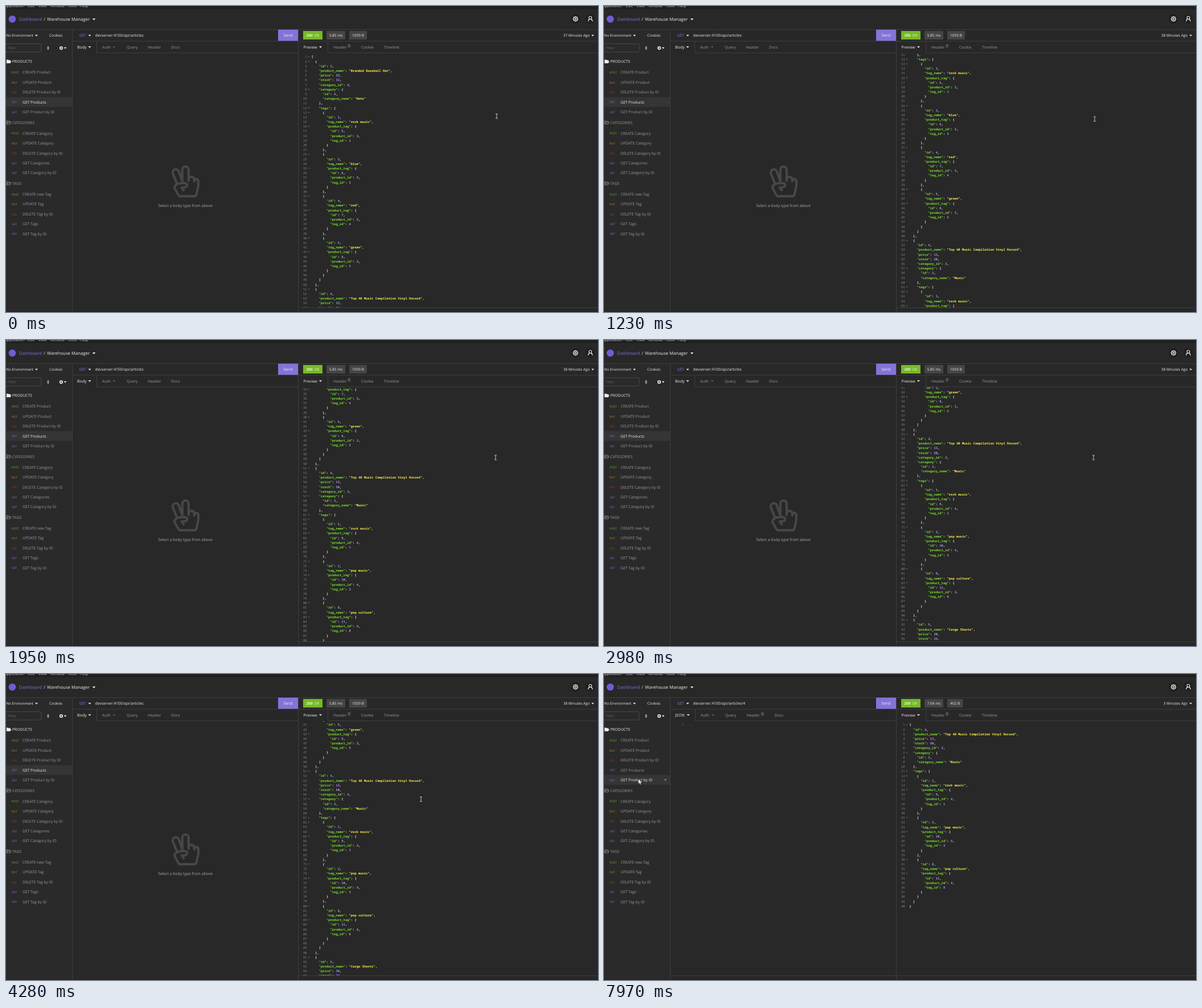
Animation, 1040 px wide and 539 px high, one loop 8000 ms. Source, as an HTML page with a canvas:

```html
<!DOCTYPE html>
<html lang="en">
<head>
<meta charset="utf-8">
<title>API client</title>
<style>
html, body { margin: 0; width: 100%; height: 100%; overflow: hidden; background: #282828; }
canvas { display: block; width: 1040px; height: 539px; }
</style>
</head>
<body>
<canvas id="stage" width="1040" height="539"></canvas>
<script>
const ctx = document.getElementById('stage').getContext('2d');
ctx.textRendering = 'geometricPrecision';

const LOOP = 8000, LINE = 8.187, CHAR = 3.3, WHEEL = 54.6;
const UI = '"Open Sans", "Noto Sans", sans-serif';
const MONO = '"Noto Sans Mono", "DejaVu Sans Mono", monospace';
const WHITE = '#eeeeee', GRAY = '#999999', RULE = '#3e3e3e', PURPLE = '#8573d8';
const METHOD = { POST: '#75ba24', PUT: '#d98a1c', DEL: '#b3332f', GET: PURPLE };

// Response data
function product(id, name, price, stock, catId, cat, tags) {
  return {
    id, product_name: name, price, stock, category_id: catId,
    category: { id: catId, category_name: cat },
    tags: tags.map(([tagId, tag, link]) => ({
      id: tagId, tag_name: tag,
      product_tag: { id: link, product_id: id, tag_id: tagId }
    }))
  };
}
const hat = product(3, 'Branded Baseball Hat', 23, 12, 4, 'Hats',
  [[1, 'rock music', 5], [3, 'blue', 6], [4, 'red', 7], [5, 'green', 8]]);
const vinyl = product(4, 'Top 40 Music Compilation Vinyl Record', 13, 50, 3, 'Music',
  [[1, 'rock music', 9], [2, 'pop music', 10], [8, 'pop culture', 11]]);
const shorts = product(5, 'Cargo Shorts', 30, 22, 2, 'Shorts', [[3, 'blue', 12]]);
const toLines = data => JSON.stringify(data, null, 2).split('\n');
const listLines = toLines([hat, vinyl, shorts]);
const itemLines = toLines(vinyl);

const folders = [
  ['PRODUCTS', 98, 117, ['POST CREATE Product', 'PUT UPDATE Product', 'DEL DELETE Product by ID',
    'GET GET Products', 'GET GET Product by ID']],
  ['CATEGORIES', 205.5, 224.3, ['POST CREATE Category', 'PUT UPDATE Category', 'DEL DELETE Category by ID',
    'GET GET Categories', 'GET GET Category by ID']],
  ['TAGS', 312.6, 331.6, ['POST CREATE new Tag', 'PUT UPDATE Tag', 'DEL DELETE Tag by ID',
    'GET GET Tags', 'GET GET Tag by ID']]
];

// Motion: [start, direction] of each wheel notch, and [time, x, y] of the pointer
const notches = [[910, 1], [1122, 1], [1330, 1], [1540, 1], [1750, 1], [1965, 1], [2940, 1], [3890, -1]];
const pointer = [
  [0, 862, 194], [950, 862, 194], [1230, 862, 199], [1700, 860, 207], [4060, 860, 207],
  [4280, 731, 220.5], [4500, 300, 222], [4690, 5, 213], [4750, 5, 210], [4930, 41, 178],
  [5339, 41, 178], [5340, 45, 175], [5480, 45, 175], [5600, 46.5, 181.5], [7330, 46.5, 181.5],
  [7480, 72, 184], [7900, 72, 184], [7970, 60.5, 185], [LOOP, 60.5, 185]
];

function scrollAt(t) {
  return notches.reduce((sum, [start, dir]) => {
    const p = Math.min(1, Math.max(0, (t - start) / 200));
    return sum + dir * WHEEL * (1 - Math.cos(Math.PI * p)) / 2;
  }, 0);
}

function pointerAt(t) {
  const i = pointer.findIndex(k => k[0] > t);
  const [t0, x0, y0] = pointer[i - 1], [t1, x1, y1] = pointer[i];
  const p = (t - t0) / (t1 - t0);
  return [x0 + (x1 - x0) * p, y0 + (y1 - y0) * p];
}

// Drawing helpers; y is the middle of the capitals
function text(s, x, y, size = 6.75, color = WHITE, align = 'left', weight = 400, family = UI) {
  ctx.font = `${weight} ${size}px ${family}`;
  ctx.textAlign = align;
  ctx.fillStyle = color;
  ctx.fillText(s, x, y + size * 0.36);
}
function box(x, y, w, h, color) {
  ctx.fillStyle = color;
  ctx.fillRect(x, y, w, h);
}
function disc(x, y, r, color) {
  ctx.fillStyle = color;
  ctx.beginPath();
  ctx.arc(x, y, r, 0, 7);
  ctx.fill();
}
function tri(x, y, r = 2.5, color = WHITE, up = 1) {
  ctx.fillStyle = color;
  ctx.beginPath();
  ctx.moveTo(x - r, y - r * 0.5 * up);
  ctx.lineTo(x + r, y - r * 0.5 * up);
  ctx.lineTo(x, y + r * 0.6 * up);
  ctx.fill();
}
function shape(d, x, y, scale, fill, stroke, width) {
  ctx.save();
  ctx.translate(x, y);
  ctx.scale(scale, scale);
  const path = new Path2D(d);
  if (fill) { ctx.fillStyle = fill; ctx.fill(path); }
  if (stroke) {
    ctx.strokeStyle = stroke;
    ctx.lineWidth = width;
    ctx.lineJoin = 'round';
    ctx.stroke(path);
  }
  ctx.restore();
}

function drawHeader() {
  box(0, 0, 1040, 5.5, '#202020');
  [['Application', -2.5], ['Edit', 38.5], ['View', 57], ['Window', 78], ['Tools', 108], ['Help', 130]]
    .forEach(([s, x]) => text(s, x, 0, 6.6, '#d0d0d0'));
  disc(11, 23, 6.3, '#6d5ed6');
  text('Dashboard', 23, 23.2, 7.75, PURPLE);
  text('/', 66, 23.2, 7.75);
  text('Warehouse Manager', 72, 23.2, 7.75);
  tri(154.5, 23.3, 2.8);

  disc(1000.5, 22.7, 8.3, '#202020');
  ctx.strokeStyle = WHITE;
  ctx.lineWidth = 1.6;
  ctx.beginPath();
  for (let i = 0; i < 8; i++) {
    const c = Math.cos(i * Math.PI / 4), s = Math.sin(i * Math.PI / 4);
    ctx.moveTo(1000.5 + 3.2 * c, 22.7 + 3.2 * s);
    ctx.lineTo(1000.5 + 4.8 * c, 22.7 + 4.8 * s);
  }
  ctx.stroke();
  ctx.lineWidth = 1.1;
  ctx.beginPath();
  ctx.arc(1000.5, 22.7, 3.4, 0, 7);
  ctx.moveTo(1001.8, 22.7);
  ctx.arc(1000.5, 22.7, 1.3, 0, 7);
  ctx.stroke();
  disc(1026.5, 22.7, 8.3, '#202020');
  shape('M2.4-2A2.4 2.4 0 1 1-2.4-2A2.4 2.4 0 1 1 2.4-2ZM-3.8 4.5Q-3.6 1-1.2.4M3.8 4.5Q3.6 1 1.2.4', 1026.5, 22.7, 1, null, WHITE, 1.1);
}

function drawSidebar(t, active) {
  text('No Environment', 0.5, 52, 6.25);
  tri(53.5, 52);
  text('Cookies', 76, 52, 6.4);
  ctx.strokeStyle = '#484848';
  ctx.lineWidth = 1;
  ctx.beginPath();
  ctx.roundRect(-4, 66.5, 66, 14.5, 2);
  ctx.stroke();
  text('Filter', 3, 74, 6.4, '#666');
  tri(74, 72.2, 2, WHITE, -1);
  tri(74, 75.8, 2);
  disc(97, 74, 3.1, WHITE);
  box(95.2, 73.6, 3.6, 0.9, '#282828');
  box(96.55, 72.2, 0.9, 3.6, '#282828');
  tri(104, 74, 2.3);

  folders.forEach(([name, y, top, items], f) => {
    const color = f ? GRAY : WHITE;
    shape('M0 5V-.5H2.5L3.3.4H6V2M0 5L1.5 2H7.5L6 5Z', 1.4, y - 2.6, 1, f ? null : WHITE, color, 0.8);
    text(name, 11, y, 6.75, color);
    items.forEach((item, i) => {
      const iy = top + i * 17.4, on = f === 0 && i === active;
      const hover = f === 0 && i === 4 && t >= 4850;
      if (on || hover) box(0, iy - 8.7, 116, 17.2, on ? '#353535' : '#303030');
      if (hover) tri(108, iy, 2.3, GRAY);
      const cut = item.indexOf(' '), method = item.slice(0, cut);
      text(method, 10, iy + 0.3, 5, METHOD[method]);
      text(item.slice(cut + 1), 29, iy, 6.72, on ? WHITE : GRAY);
    });
  });
}

function drawRequest(single) {
  text('GET', 128.5, 52, 6.7, PURPLE);
  tri(147, 52);
  text('devserver:4100/api/articles' + (single ? '/4' : ''), 156.5, 51.8, 6.75);
  box(478, 41.5, 35.5, 20, PURPLE);
  text('Send', 495.5, 52, 6.8, WHITE, 'center');

  const d = single ? 1 : 0;
  text(single ? 'JSON' : 'Body', 125, 72.3, 7);
  tri(147 + d, 72.3);
  text('Auth', 169 + d, 72.3, 6.75, GRAY);
  tri(190 + d * 1.5, 72.3, 2.3, '#666');
  text('Query', 212 + d, 72.3, 6.75, GRAY);
  text('Header', 249 + d * 1.5, 72.3, 6.75, GRAY);
  text('Docs', 290 + d * 9.5, 72.3, 6.75, GRAY);
  box(159 + d, 62, 1, 20, RULE);
  box(159 + d, 82, 354 - d, 1, RULE);

  if (single) {
    badge('2', 278.3);
    text('1', 139.8, 89.5, 5.5, '#858585', 'right', 400, MONO);
    text('...', 148, 89.5, 5.5, '#777', 'left', 400, MONO);
    box(117, 531, 397, 1, RULE);
  } else {
    shape('M98 305L28 134C8 72 98 38 119 98L172 248H175V74C175 8 273 8 273 74V248V228' +
      'C273 170 360 170 360 228V256C360 200 424 210 424 256V326L396 455Q388 488 354 488H148' +
      'Q124 488 112 466L57 368Q44 340 66 320L98 292L190 280Q256 280 250 325Q245 352 165 352L205 405',
      290, 280, 0.113, null, '#474747', 36);
    text('Select a body type from above', 315, 352, 6.8, '#aaaaaa', 'center');
  }
}

function badge(s, x) {
  box(x - 2.7, 67, 5.4, 6.6, '#414141');
  text(s, x, 70.3, 4.6, '#bbb', 'center');
}

function pill(s, x, w, color) {
  ctx.fillStyle = color;
  ctx.beginPath();
  ctx.roundRect(x, 44, w, 15, 1);
  ctx.fill();
  text(s, x + w / 2, 52, 6.5, WHITE, 'center');
}

function drawCode(lines, scroll, allFolds) {
  ctx.save();
  ctx.beginPath();
  ctx.rect(514, 83, 526, 448.5);
  ctx.clip();
  lines.forEach((line, i) => {
    const y = 89.5 + i * LINE - scroll;
    if (y < 78 || y > 537) return;
    text(i + 1, 528.5, y, 5.5, '#858585', 'right', 400, MONO);
    if (/[{[]$/.test(line) && (allFolds || i === 0)) tri(532, y, 1.4, '#858585');
    for (const m of line.matchAll(/"[^"]*"|\d+|[^"\d\s]+/g)) {
      const s = m[0], key = line[m.index + s.length] === ':';
      const color = s[0] === '"' ? (key ? '#79db2c' : '#f5ee45') : /\d/.test(s) ? '#ab92f5' : '#f2f2f2';
      text(s, 536.5 + m.index * CHAR, y, 5.5, color, 'left', 600, MONO);
    }
  });
  ctx.restore();
}

function drawResponse(t, single) {
  ctx.fillStyle = '#75ba24';
  box(522, 44, 34, 15, '#75ba24');
  text('200', 527.5, 52, 6.5, WHITE, 'left', 700);
  text('OK', 541.5, 52, 6.5);
  pill(single ? '7.69 ms' : '5.85 ms', 563, 33, '#454545');
  pill(single ? '402 B' : '1059 B', 603, single ? 27.5 : 31, '#454545');
  const age = single ? 3 : t < 950 ? 37 : 38;
  text(age + ' Minutes Ago', 1025.5, 52, 6.45, WHITE, 'right');
  tri(1030.7, 52, 2.3);

  text('Preview', 522.5, 72.3, 6.75);
  tri(552.5, 72.3);
  text('Header', 575, 72.3, 6.75, GRAY);
  badge('7', 602.7);
  text('Cookie', 624, 72.3, 6.75, GRAY);
  text('Timeline', 664, 72.3, 6.75, GRAY);
  box(565, 62, 1, 20, RULE);
  box(565, 82, 475, 1, RULE);
  drawCode(single ? itemLines : listLines, single ? 0 : scrollAt(t), !single || t >= 6000);
  box(514, 531, 526, 1, RULE);
}

function drawPointer(t) {
  const [x, y] = pointerAt(t);
  if (x > 514) shape('M-2-4H-.6L0-3.5L.6-4H2M0-3.5V3.5M-2 4H-.6L0 3.5L.6 4H2', x, y, 1, null, '#dddddd', 0.9);
  else shape('M0 0V8.6L2 6.8L3.4 9.8L4.8 9.2L3.5 6.3H6.2Z', x, y, 1, '#ffffff', '#222222', 0.4);
}

function draw(t) {
  box(0, 0, 1040, 539, '#282828');
  box(0, 41, 116, 498, '#2a2a2a');
  drawHeader();
  drawSidebar(t, t < 5510 ? 3 : 4);
  drawRequest(t >= 5550);
  drawResponse(t, t >= 5590);
  box(0, 41, 478, 1, RULE);
  box(514, 41, 526, 1, RULE);
  box(117, 61.5, 361, 1, RULE);
  box(514, 61.5, 526, 1, RULE);
  box(116, 41, 1, 498, RULE);
  box(513, 41, 1, 498, RULE);
  box(0, 538, 1040, 1, '#1e1e1e');
  drawPointer(t);
}

const begin = performance.now();
function frame() {
  draw((performance.now() - begin) % LOOP);
  requestAnimationFrame(frame);
}
frame();
</script>
</body>
</html>
```
